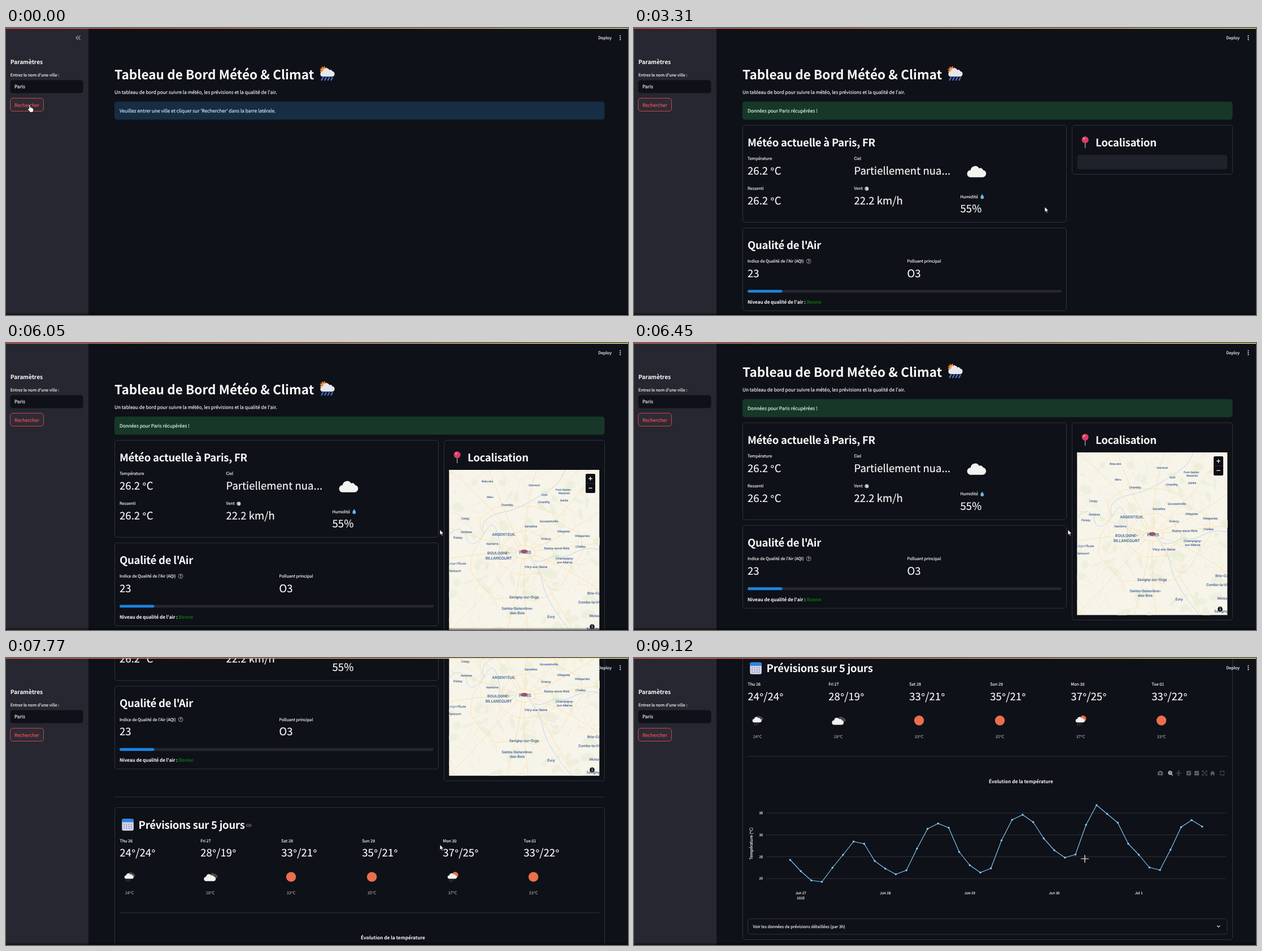
These frames come from a looping animation (1101 px wide and 509 px high, 9.19 s). An HTML page:

```html
<!DOCTYPE html>
<html lang="fr">
<head>
<meta charset="utf-8">
<title>Tableau de bord</title>
<style>
html, body { margin: 0; width: 100%; height: 100%; overflow: hidden; background: #0e1117; }
svg { display: block; }
text {
  font-family: "Noto Sans CJK JP", "Noto Sans CJK SC", "Noto Sans CJK KR", "Noto Sans", sans-serif;
  color: #fafafa; fill: currentColor; stroke: currentColor; stroke-width: .16px;
  text-rendering: geometricPrecision; white-space: pre;
}
.b, .h, .semi { font-weight: 700; stroke: none; }
.h { letter-spacing: -.27px; }
.semi { letter-spacing: -.1px; }
.mid { text-anchor: middle; }
.end { text-anchor: end; }
.dim { color: #9fa0a3; }
.deg, .dots { font-family: "Open Sans", "Noto Sans", sans-serif; }
.deg { font-size: .92em; }
.dots { font-size: 1.08em; }
.card { fill: none; stroke: #303338; }
.rule { stroke: #2e3136; }
.place { font-family: Inter, "Open Sans", sans-serif; font-weight: 500; color: #4b6a9b; text-anchor: middle; }
.line { fill: none; stroke-linecap: round; stroke-linejoin: round; }
</style>
</head>
<body>
<svg id="stage" width="1101" height="509" xmlns="http://www.w3.org/2000/svg"></svg>
<script>
const LOOP = 9190;
const S = 7.24, M = 8.27, H = 18.6, TICK = 6.2;
const $ = id => document.getElementById(id);
const clamp = (v, a = 0, b = 1) => Math.min(b, Math.max(a, v));
const ramp = (t, a, b) => clamp((t - a) / (b - a));

// Drawing helpers
const text = (x, y, size, str, cls = '', more = '') =>
  `<text x="${x}" y="${y}" font-size="${size}" class="${cls}" ${more}>` +
  str.replace(/[°…]/g, c => `<tspan class="${c == '°' ? 'deg' : 'dots'}">${c}</tspan>`) + '</text>';
const rect = (x, y, w, h, r, fill, more = '') =>
  `<rect x="${x}" y="${y}" width="${w}" height="${h}" rx="${r}" fill="${fill}" ${more}/>`;
const card = (x, y, w, h, id = '') =>
  `<rect x="${x}" y="${y}" width="${w}" height="${h}" rx="4.5" class="card" id="${id}"/>`;
const dot = (x, y, r, fill, more = '') => `<circle cx="${x}" cy="${y}" r="${r}" fill="${fill}" ${more}/>`;
const line = (d, color, width = 1, more = '') =>
  `<path d="${d}" class="line" stroke="${color}" stroke-width="${width}" ${more}/>`;
const shape = (d, fill, more = '') => `<path d="${d}" fill="${fill}" ${more}/>`;
const rule = (x1, x2, y) => `<path d="M${x1} ${y}H${x2}" class="rule"/>`;
const group = (id, body, hidden = false) => `<g id="${id}" ${hidden ? 'opacity="0"' : ''}>${body}</g>`;
const metric = (x, y, label, value) => text(x, y, S, label) + text(x, y + 25.6, H, value);
const cloud = (x, y, k, fill) => shape('M6.5 22h22a6.5 6.5 0 0 0 1-12.9a5 5 0 0 0-7-3a8 8 0 0 0-15 3.2a6.4 6.4 0 0 0-1 12.7z',
  fill, `transform="translate(${x} ${y}) scale(${k})"`);
const rain = (x, y) => line(`M${x} ${y}l-.8 1.8m4-1.8l-.8 1.8m4-1.8l-.8 1.8m-5 1.2l-.6 1.2m4-1.2l-.6 1.2`, '#77797c', .7);

let seed = 7;
const rnd = (a, b) => {
  seed = (seed * 16807) % 2147483647;
  return a + (b - a) * seed / 2147483647;
};

function title() {
  const rays = [...Array(9)].map((_, i) => {
    const a = i * .7;
    return dot(562.5 + 5.6 * Math.cos(a), 75 + 5.6 * Math.sin(a), 1.4, '#ee8130');
  }).join('');
  return text(192, 90.7, 22.6, 'Tableau de Bord Météo &amp; Climat', 'b') +
    rays + dot(562.5, 75, 4.8, '#f5983a') + cloud(555.5, 69.8, .75, '#e6e6ee') +
    line('M561 88l-2.4 4.4m8-4.4l-2.4 4.4m8-4.4l-2.4 4.4m8-4.4l-2.4 4.4', '#4878e0', 2.1) +
    text(192, 117.3, M, "Un tableau de bord pour suivre la météo, les prévisions et la qualité de l'air.");
}

function alerts() {
  return group('info', rect(192, 130.5, 867.5, 32, 4.5, '#172d43') +
      text(201, 150.3, M, "Veuillez entrer une ville et cliquer sur 'Rechercher' dans la barre latérale.", '', 'style="color:#d5effd"')) +
    group('wait', dot(198, 138, 4.5, 'none', 'stroke="#31333f" stroke-width="1.4"') +
      line('M198 133.5a4.5 4.5 0 0 1 4.5 4.5', '#fafafa', 1.4, 'id="spin"') +
      text(209, 141.2, M, 'Récupération des données…'), true) +
    group('done', rect(192, 130.5, 867.5, 32, 4.5, '#173828') +
      text(201, 150.3, M, 'Données pour Paris récupérées !', '', 'style="color:#dffde9"'), true);
}

function weather() {
  return card(192.5, 172.5, 573, 172) +
    text(201, 210, H, 'Météo actuelle à Paris, FR', 'h') +
    metric(201, 234.4, 'Température', '26.2 °C') +
    metric(389.5, 234.4, 'Ciel', 'Partiellement nua…') +
    metric(201, 287.4, 'Ressenti', '26.2 °C') +
    metric(389.5, 287.4, 'Vent', '22.2 km/h') +
    metric(577.5, 301.6, 'Humidité', '55%') +
    cloud(588.4, 242.8, 1, '#f2f2f0') +
    dot(412, 285, 3.4, '#d3d6da') + line('M407.6 284h3m-2 2.4h3m1.6-3.4l1 .2', '#73777e', .8) +
    shape('M616.3 294.6c1.5 2.4 3 4 3 5.6a3 3 0 0 1-6 0c0-1.6 1.5-3.2 3-5.6z', '#6bb4ea');
}

function air() {
  return card(192.5, 354.5, 573, 147) +
    text(201, 392, H, "Qualité de l'Air", 'h') +
    metric(201, 416.3, "Indice de Qualité de l'Air (AQI)", '23') +
    metric(483.5, 416.3, 'Polluant principal', 'O3') +
    dot(309.2, 413.6, 3.9, 'none', 'stroke="#b5b7bb" stroke-width=".8"') +
    text(309.2, 416, 6, '?', 'mid') +
    rect(201, 464.4, 556, 4.9, 2.4, '#262730') + rect(201, 464.4, 61.5, 4.9, 2.4, '#1c83e1') +
    text(201, 489, M, "Niveau de qualité de l'air :", 'semi') +
    text(305.8, 489, M, 'Bonne', 'semi', 'style="color:#067306"');
}

const towns = {
  4.6: 'Beauvais 852 245|Clermont 935 252|Creil 953 269.5|Pont-Sainte- 987 260.5|Maxence 988 266.3|Méru 857 273.5',
  5.1: 'Chambly 887 287|Chantilly 952 282|Senlis 988 279|Cergy 813 311|Goussainville 961 316|Sarcelles 929 325|' +
    "Achères 815 335.5|Poissy 800 345.5|Villepinte 987 334.5|Villeparisis 1020 342|Drancy 956 347|Nanterre 861 356.5|" +
    "Chelles 1017 361.5|St-Cyr-l'École 797 391|Élancourt 794 404",
  5.5: 'Rosny-sous-Bois 975 364|Champigny- 989 382|sur-Marne 989 388.8|Vitry-sur-Seine 938 397',
  6.2: 'Savigny-sur-Orge 917 451|Sainte-Geneviève- 905 471|des-Bois 905 479|Évry 965 486|Brie-Comte 1046 444|' +
    'Combs-la-Ville 1035 460|Moissy 1043 484|Savigny 1039 507',
  6.6: 'ARGENTEUIL 881 339.5|BOULOGNE- 872 372.7|BILLANCOURT 872 381.7',
  7.6: 'PARIS 919 371'
};

function mapLand() {
  let parks = '', lanes = '';
  for (let i = 0; i < 75; i++) {
    const x = rnd(784, 1050), y = rnd(225, 514);
    parks += `<ellipse cx="${x}" cy="${y}" rx="${rnd(3, 13)}" ry="${rnd(2, 8)}" transform="rotate(${rnd(0, 180)} ${x} ${y})"/>`;
  }
  for (let i = 0; i < 230; i++) {
    lanes += `M${rnd(780, 1050)} ${rnd(222, 514)}q${rnd(-12, 12)} ${rnd(-12, 12)} ${rnd(-32, 32)} ${rnd(-28, 28)}`;
  }
  return `<g fill="#e9eed9" opacity=".7">${parks}</g>` + line(lanes, '#f3e6c6', .55);
}

function ring(rx, ry) {
  const pts = [...Array(18)].map((_, i) => {
    const a = i * Math.PI / 9, k = rnd(.85, 1.15);
    return [918 + rx * k * Math.cos(a), 372 + ry * k * Math.sin(a)];
  });
  return `M${pts.join('L')}z`;
}

function mapRoads() {
  let radial = '';
  for (let i = 0; i < 13; i++) {
    const a = i * .4833 + rnd(-.15, .15), c = Math.cos(a), s = Math.sin(a), k = rnd(-25, 25);
    radial += `M${917 + 16 * c} ${370 + 11 * s}Q${917 + 80 * c - k * s} ${370 + 80 * s + k * c} ${917 + 210 * c} ${370 + 210 * s}`;
  }
  return line('M784 342C798 322 812 330 815 345S832 362 846 338 866 320 872 345 866 388 885 383 902 362 916 369 932 386 941 400' +
      ' 948 430 958 450 975 482 1002 514M936 386C955 392 962 374 982 378S1012 358 1050 366M846 338C838 320 850 306 880 300S930 280 950 268 980 250 990 225', '#bdd7e8', 1) +
    line(radial + ring(18, 12) + ring(46, 40) + ring(94, 86), '#f9dfa4', .8);
}

function mapLabels() {
  return Object.entries(towns).map(([size, list]) => list.split('|').map(item => {
    const [, name, x, y] = item.match(/(.+) (\S+) (\S+)$/);
    return text(x, +y + size * .36, size, name, 'place');
  }).join('')).join('');
}

function mapCard() {
  return card(775.5, 172.5, 284, 87, 'frame') +
    line('M798.6 203v9.5', '#a9adb5', 1.3) + dot(798.6, 198.2, 6, '#dc3c62') + dot(796.8, 196, 1.8, '#f08aa2') +
    text(817, 210, H, 'Localisation', 'h') +
    group('bone', rect(784.5, 225, 265.8, 25.6, 4.5, '#1f222a')) +
    '<g clip-path="url(#mapClip)">' +
    group('base', rect(784, 225, 267, 289, 0, '#f7f4ea'), true) +
    group('land', mapLand(), true) + group('roads', mapRoads(), true) +
    group('spot', '<ellipse cx="917.3" cy="369.6" rx="6" ry="3.3" fill="#c2301f" opacity=".85"/>', true) +
    group('labels', mapLabels(), true) +
    group('tools', rect(1026, 232, 17, 34, 2, '#0c0e13') + rule(1026, 1043, 249) +
      line('M1031.7 240.5h5.6m-2.8-2.8v5.6m-2.8 14h5.6', '#fff', 1.3) +
      dot(1037.5, 503, 4.3, '#0b0b0d') + line('M1037.5 502.6v2.6', '#fff', 1.2) + dot(1037.5, 500.6, .8, '#fff'), true) +
    '</g>';
}

const days = ['Thu 26 24 24', 'Fri 27 28 19', 'Sat 28 33 21', 'Sun 29 35 21', 'Mon 30 37 25', 'Tue 01 33 22'];
const SUN = '#ec6e4c', WHITE = '#f2f2f0', GREY = '#48484a';

function sky(i, c) {
  if (i == 0) return cloud(c - 4.5, 683.6, .42, GREY) + cloud(c - 9.5, 685.6, .48, WHITE) + rain(c - 5, 697.5);
  if (i == 1) return cloud(c - 3, 685, .46, GREY) + cloud(c - 12, 686.8, .62, WHITE);
  if (i == 4) return dot(c + 4.3, 689.6, 5.6, SUN) + cloud(c - 9.5, 685.6, .48, WHITE) + rain(c - 5, 697.5);
  return dot(c, 692.8, 8.7, SUN);
}

function forecast() {
  let out = rule(192, 1059.5, 551) + card(192.5, 570, 867, 511.5) +
    rect(205.3, 589.8, 20.6, 21, 3, '#d5d4ea') + shape('M205.3 596v-3.2a3 3 0 0 1 3-3h14.6a3 3 0 0 1 3 3v3.2z', '#2c85df');
  for (let i = 0; i < 12; i++) out += dot(209.3 + i % 4 * 4.2, 599.6 + (i >> 2) * 3.7, 1, i == 6 ? '#2c85df' : '#8384b4');
  out += text(234.5, 607.3, H, 'Prévisions sur 5 jours', 'h') +
    group('link', line('M429 599.6h-1.6a2 2 0 0 0 0 4h1.6m1.6 0h1.6a2 2 0 0 0 0-4h-1.6m-2 2h2.6', '#8d8f94', .9), true);
  days.forEach((day, i) => {
    const [name, num, hi, lo] = day.split(' '), x = 201.3 + 143 * i, c = x + 17.3;
    out += metric(x, 631.4, `${name} ${num}`, `${hi}°/${lo}°`) + sky(i, c) + text(c, 724, S, `${hi}°C`, 'mid dim');
  });
  return out + rule(201.5, 1050, 756.4) + chart() +
    card(201.5, 1044.5, 848.5, 27.5) +
    text(210.5, 1060.9, S, 'Voir les données de prévisions détaillées (par 3h)') +
    line('M1032.3 1056.8l2.4 2.4 2.4-2.4', '#fafafa', 1.1);
}

// Chart heights every three hours, in stage pixels
const curve = [358, 378, 394.5, 397, 372, 349, 325.5, 329.5, 360, 373.5, 383.5, 376.5, 338, 303, 293.5, 301, 344, 367.5, 380.5, 373,
  323.5, 287, 278, 291, 320, 341, 354, 348.5, 296, 261, 276.5, 292, 329.5, 349, 371.5, 376, 340, 300, 287.5, 299];

function chart() {
  let out = text(685, 804, M, 'Évolution de la température', 'b mid');
  [35, 30, 25, 20].forEach((v, i) => {
    const y = 857 + 38.7 * i;
    out += rule(234, 1048, y) + text(228.3, y + 2.3, TICK, String(v), 'end');
  });
  ['Jun 27', 'Jun 28', 'Jun 29', 'Jun 30', 'Jul 1'].forEach((d, i) => out += text(295.2 + 149.6 * i, 1001, TICK, d, 'mid'));
  out += text(295.2, 1010, TICK, '2025', 'mid') +
    text(0, 0, S, 'Température (°C)', 'mid', 'transform="translate(210 911) rotate(-90)"');
  const pts = curve.map((y, i) => [276.5 + 18.7 * i, y + 582]);
  out += line('M' + pts.join('L'), '#83c9ff', 1.15) + pts.map(([x, y]) => dot(x, y, 1.75, '#83c9ff')).join('');
  return out + group('bar', modeBar(), true);
}

function modeBar() {
  const g = '#5d6066', lit = '#d8d9db', back = '#0e1117';
  return shape('M927 783.5h2.2l1-1.5h2.8l1 1.5h2.2v6.5h-9.2z', g) + dot(931.6, 786.6, 1.7, back) +
    dot(949, 785.6, 2.9, 'none', `stroke="${lit}" stroke-width="1.3"`) +
    line('M951.3 788l2.2 2.2m-5.8-4.6h2.6m-1.3-1.3v2.6', lit, 1.1) +
    line('M959.8 786.3h8.4m-4.2-4.2v8.4m-1.2-7.4l1.2-1.2 1.2 1.2m-2.4 6.4l1.2 1.2 1.2-1.2', g, 1) +
    rect(978, 782.2, 8, 8, 1, g) + line('M980 786.2h4m-2-2v4', back, 1) +
    rect(992, 782.2, 8, 8, 1, g) + line('M994 786.2h4', back, 1) +
    line('M1006 784.5v-2.3h2.3m3.4 0h2.3v2.3m0 3.4v2.3h-2.3m-3.4 0h-2.3v-2.3m2-3.7l4 4m0-4l-4 4', g, 1) +
    shape('M1019.5 786.5l4.5-4.5 4.5 4.5h-1.3v3.7h-2.2v-2.5h-2v2.5h-2.2v-3.7z', g) +
    line('M1038 785v-2.3h2.3m1.8 0h2.3v2.3m0 2.2v2.3h-2.3m-1.8 0h-2.3v-2.3', g, 1);
}

function sidebar() {
  return rect(0, 0, 146, 509, 0, '#262730') +
    group('fold', line('M127 14.2l-3 3.1 3 3.1m4-6.2l-3 3.1 3 3.1', '#b4b6bd', 1.1)) +
    text(7.8, 64.2, 10.27, 'Paramètres', 'semi') +
    text(7.8, 86.2, S, "Entrez le nom d'une ville :") +
    rect(7.5, 92.5, 129, 23, 4.5, '#0e1117') + text(15, 107.4, M, 'Paris') +
    rect(7.5, 124.5, 59, 23, 4.5, '#2b2c36', 'id="btn" stroke="#ff4b4b" stroke-width=".8"') +
    text(15, 139.7, M, 'Rechercher', '', 'id="btnText"');
}

const poses = [
  'M1002.5 15l-2.5 4 2.5 1.8-.8 3m-1.7-5l-1.5 2.5-3 .3m7-6.6l-3-.6-2 2.3m5-1.7l1.5 2 2 .2',
  'M996 22q1.5-1.5 3 0t3 0 3 0 3 0m-10-2l4-3 3.5 2.5m-3.5-2.5l-2.5-1.5-3 1',
  'M998 19.5a2 2 0 1 0 .1 0m7.9 0a2 2 0 1 0 .1 0m-5.1 2.5v-2.5l-2-2 3-2.5 2 2h2'
];

function header() {
  return text(1048.3, 20.2, S, 'Deploy') +
    [13.8, 17.2, 20.6].map(y => dot(1087.3, y, 1.05, '#fafafa')).join('') +
    group('run', dot(1003.3, 12.8, 1.4, '#85878c') + line(poses[0], '#85878c', 1.5, 'id="pose"') + text(1017.8, 20.2, S, 'Stop'), true);
}

const edge = 'stroke="#000" stroke-width=".7" stroke-linejoin="round"';
const cursors =
  group('hand', shape('M-1.3 1q0-1.1 1.1-1.1t1.1 1.1v4l.3-.4q1.7-.4 1.9 1 1.7-.5 2 .8 1.5-.2 1.5 1.2v2.4q0 1.5-1 2.7v.9h-5.3v-.9l-3.7-4.4q-.6-1.3.6-1.5 .9.1 1.5 1z', '#fff', edge)) +
  group('arrow', shape('M0 0v9.6l2.2-2 1.5 3.5 1.6-.7-1.5-3.4h3z', '#fff', edge)) +
  group('cross', line('M-6.5 0h13m-6.5-6.5v13', '#fff', 1.2));

$('stage').innerHTML = `<defs>
  <clipPath id="mapClip"><rect x="784.3" y="225" width="266" height="288.5"/></clipPath>
  <linearGradient id="top"><stop stop-color="#ff4b4b"/><stop offset="1" stop-color="#fffd80"/></linearGradient>
  <linearGradient id="foot" x2="0" y2="1"><stop stop-opacity="0"/><stop offset="1" stop-opacity=".55"/></linearGradient></defs>` +
  group('page', title() + alerts() + group('now', weather(), true) + group('air', air(), true) +
    group('where', mapCard(), true) + group('next', forecast(), true)) +
  sidebar() + header() +
  rect(0, 0, 1101, 1.2, 0, 'url(#top)') + rect(0, 504.5, 1101, 4.5, 0, 'url(#foot)') +
  group('cursor', cursors);

// Wheel notches: start time and number of steps
const NOTCH = 145.5, STEP = 66;
const notches = [[6320, 6], [7050, 5], [7770, 4], [8110, 5]];
const scrollAt = t => notches.reduce((sum, [t0, n]) => {
  const k = clamp(Math.floor((t - t0) / STEP) + 1, 0, n);
  const x = Math.max(0, (k - .3) / (n - .3));
  return sum + NOTCH * x * x * (3 - 2 * x);
}, 0);

const trail = [[2150, 42, 136], [2480, 253, 181], [3100, 727, 317], [3380, 727, 317], [3580, 774, 333],
  [4110, 774, 333], [4250, 768, 331], [9000, 768, 331]];

function cursorAt(t) {
  if (t >= 8440) {
    const k = t < 9060 ? 0 : t < 9120 ? .5 : 1;
    return [770 + 28 * k, 331 + 25 * k];
  }
  const i = trail.findIndex(p => p[0] > t);
  if (i < 1) return trail[0].slice(1);
  const [t0, x0, y0] = trail[i - 1], [t1, x1, y1] = trail[i], k = ramp(t, t0, t1);
  return [x0 + (x1 - x0) * k, y0 + (y1 - y0) * k];
}

const fade = (id, v) => $(id).setAttribute('opacity', +v);
const move = (id, x, y) => $(id).setAttribute('transform', `translate(${x} ${y})`);

function draw(t) {
  const within = (a, b = LOOP) => t >= a && t < b;
  const pressed = within(270, 540), loading = within(1130, 1610), tall = t >= 3380;
  $('btn').setAttribute('fill', pressed ? '#ff4b4b' : '#2b2c36');
  $('btnText').style.color = pressed ? '#fff' : '#ff4b4b';
  fade('fold', t < 2350);
  fade('run', within(1130, 3170));
  $('pose').setAttribute('d', poses[t < 1610 ? 0 : Math.floor((t - 1610) / 200) % 3]);

  fade('info', t < 1610 ? 1 - .6 * ramp(t, 1130, 1540) : 0);
  move('info', 0, loading ? 23.3 : 0);
  fade('wait', loading);
  $('spin').setAttribute('transform', `rotate(${t * .5 % 360} 198 138)`);
  fade('done', t >= 1610);

  fade('now', t >= 2210);
  fade('air', t >= 2480);
  fade('where', t >= 2750);
  fade('next', t >= 2900);
  $('frame').setAttribute('height', tall ? 350 : 87);
  fade('bone', !tall);
  fade('tools', t >= 4110);
  fade('spot', t >= 4110);
  fade('base', within(4670, 4740) ? .6 : t >= 4740);
  fade('land', ramp(t, 5210, 5600));
  fade('roads', ramp(t, 5350, 5800));
  fade('labels', ramp(t, 5600, 6050));
  fade('link', within(7310, 7840));
  fade('bar', ramp(t, 8440, 8700));
  move('page', 0, -scrollAt(t));

  move('cursor', ...cursorAt(t));
  fade('hand', t < 2210);
  fade('arrow', within(2210, 8440));
  fade('cross', t >= 8440);
}

const start = performance.now();
function tick() {
  draw((performance.now() - start) % LOOP);
  requestAnimationFrame(tick);
}
tick();
</script>
</body>
</html>
```
